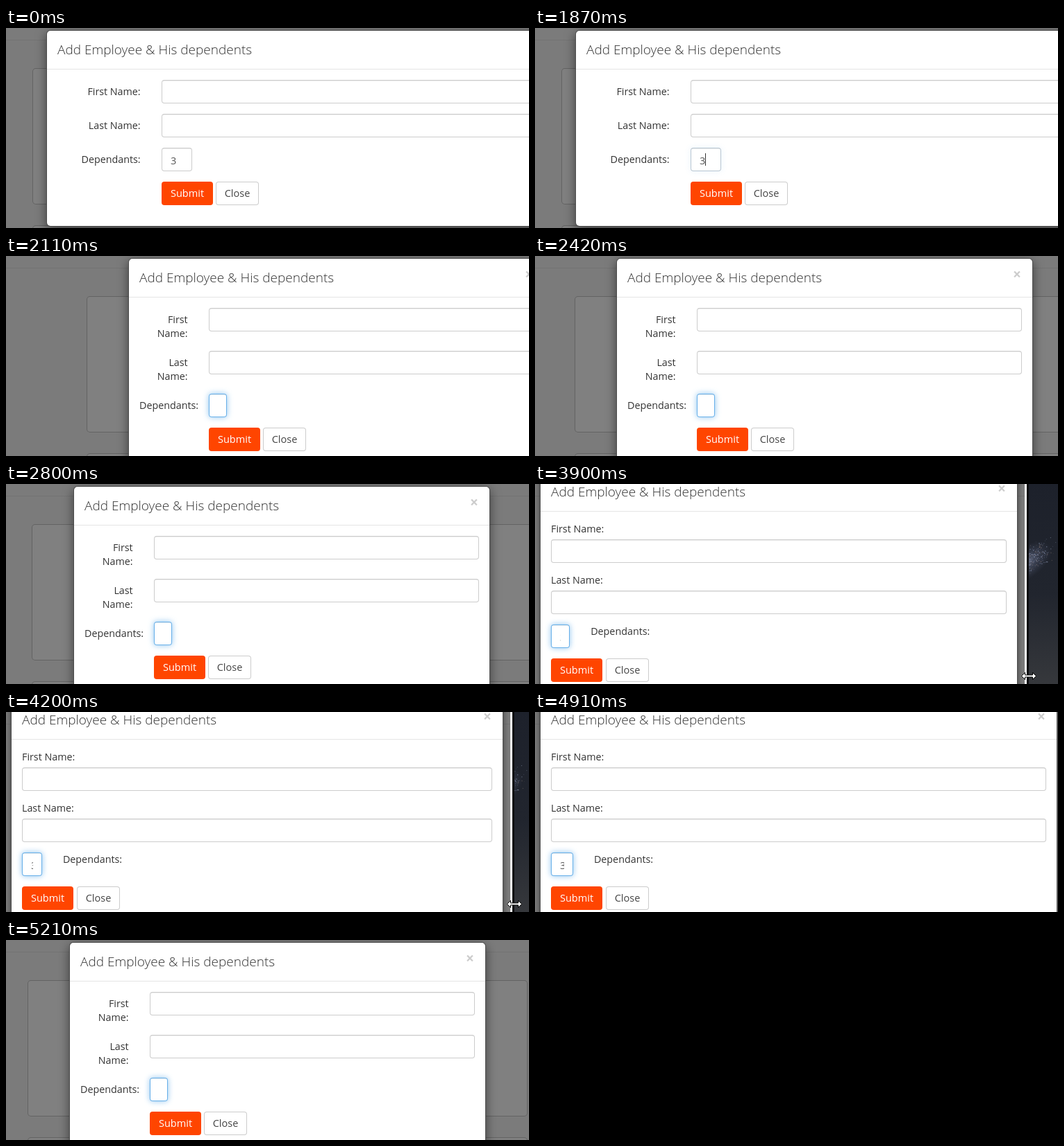
An HTML page with a canvas that plays this animation: 753 px wide and 289 px high, repeating every 5290 ms.

```html
<!DOCTYPE html>
<html lang="en">
<head>
<meta charset="utf-8">
<title>Responsive form dialog</title>
<style>
html, body { margin: 0; width: 100%; height: 100%; overflow: hidden; background: #7b7b7b; }
canvas { display: block; width: 100vw; height: 100vh; }
</style>
</head>
<body>
<canvas id="stage"></canvas>
<script>
const WIDTH = 753, HEIGHT = 289, LOOP = 5290;
const SHIFT = 3; // pixels of the page hidden left of the stage
const FONT = '"Open Sans", "Noto Sans", sans-serif';
const canvas = document.getElementById('stage');
const dpr = window.devicePixelRatio || 1;
canvas.width = WIDTH * dpr;
canvas.height = HEIGHT * dpr;
const ctx = canvas.getContext('2d');
ctx.scale(dpr, dpr);

// Window drags: start, end, number of redraws
const drags = [
  [1870, 2340, 7], [2420, 2800, 6], [2970, 3270, 5],
  [3720, 4200, 7], [4280, 4750, 7], [4830, 5210, 6]
];
// Window width over time
const widths = [
  [0, 1022], [1870, 1022], [1950, 1018], [2030, 1000], [2110, 955],
  [2260, 880], [2340, 850], [2420, 840], [2800, 800], [2970, 784],
  [3270, 695], [3720, 698], [4200, 729], [4280, 733], [4750, 758],
  [4830, 761], [4910, 765], [5210, 788]
];

function snap(t) {
  const drag = drags.filter(d => d[0] <= t).pop();
  if (!drag) return 0;
  const [start, end, count] = drag;
  const step = (end - start) / (count - 1);
  return start + step * Math.min(count - 1, Math.floor((t - start) / step + 1e-6));
}

function widthAt(t) {
  const i = widths.findIndex(k => k[0] > t);
  if (i < 0) return widths[widths.length - 1][1];
  const [t0, a] = widths[i - 1], [t1, b] = widths[i];
  return Math.round(a + (b - a) * (t - t0) / (t1 - t0));
}

function layoutFor(w) {
  const stack = w < 768, wide = w >= 992;
  const size = stack ? w - 20 : wide ? 900 : 600;
  const left = stack ? 10 - SHIFT : Math.round((w - size) / 2) - SHIFT;
  const col = (size - 2) / 12;
  const inner = left + 1, right = left + size - 1;
  const field = Math.round(inner + 15 + (stack ? 0 : 2 * col));
  return {
    w, stack, wide, size, left, col, inner, right, field,
    top: stack ? -17 : 3,
    bottom: wide ? 287 : 313,
    rows: stack ? [80, 154, 203, 252] : wide ? [75, 124, 173, 222] : [75, 137, 199, 248]
  };
}

function rect(x, y, w, h, r, fill) {
  ctx.fillStyle = fill;
  ctx.beginPath();
  ctx.roundRect(x, y, w, h, r);
  ctx.fill();
}

function box(x, y, w, h, border, fill, r = 4) {
  rect(x, y, w, h, r, border);
  rect(x + 1, y + 1, w - 2, h - 2, r - 1, fill);
}

function text(str, x, y, size, color, weight = 400, align = 'left') {
  ctx.font = `${weight} ${size}px ${FONT}`;
  ctx.fillStyle = color;
  ctx.textAlign = align;
  ctx.fillText(str, x, y);
}

function withShadow(color, blur, dy, draw) {
  ctx.save();
  ctx.shadowColor = color;
  ctx.shadowBlur = blur * dpr;
  ctx.shadowOffsetY = dy * dpr;
  draw();
  ctx.restore();
}

let seed = 11;
function random() {
  seed = (seed * 16807) % 2147483647;
  return seed / 2147483647;
}
const spread = () => random() + random() + random() - 1.5;
const dots = Array.from({ length: 330 }, () => {
  const along = spread() * 34, across = spread() * 15;
  return {
    x: 712 + along * 0.85 + across * 0.5,
    y: 109 - along * 0.55 + across * 0.85,
    size: 0.6 + random() * 0.8,
    color: random() < 0.3 ? '176,150,140' : '165,178,210',
    alpha: 0.15 + random() * 0.5
  };
});

function drawDesktop(edge) {
  const sky = ctx.createLinearGradient(0, 0, 0, HEIGHT);
  sky.addColorStop(0, '#1d212b');
  sky.addColorStop(0.55, '#21252e');
  sky.addColorStop(1, '#36383c');
  ctx.fillStyle = sky;
  ctx.fillRect(edge, 0, WIDTH - edge, HEIGHT);
  ctx.save();
  ctx.translate(704, 115);
  ctx.rotate(-0.6);
  ctx.scale(1, 0.5);
  const haze = ctx.createRadialGradient(0, 0, 0, 0, 0, 46);
  haze.addColorStop(0, 'rgba(170,180,212,.65)');
  haze.addColorStop(0.4, 'rgba(115,125,158,.35)');
  haze.addColorStop(1, 'rgba(90,100,130,0)');
  ctx.fillStyle = haze;
  ctx.fillRect(-46, -46, 92, 92);
  ctx.restore();
  for (const d of dots) {
    ctx.fillStyle = `rgba(${d.color},${d.alpha})`;
    ctx.fillRect(d.x, d.y, d.size, d.size);
  }
}

function drawPage(w) {
  const edge = w - SHIFT;
  if (edge < WIDTH) drawDesktop(edge);
  ctx.fillStyle = '#7b7b7b';
  ctx.fillRect(0, 0, edge, HEIGHT);
  ctx.fillStyle = '#737373';
  ctx.fillRect(0, 17, edge, 1);
  const grid = w >= 992 ? 970 : w >= 768 ? 750 : w;
  const x = Math.round((w - grid) / 2) + 15 - SHIFT;
  box(x, 58, grid - 30, 197, '#636363', '#808080', 5);
  box(x, 285, grid - 30, 60, '#636363', '#808080', 5);
}

function drawFrame(w) {
  const edge = w - SHIFT;
  if (edge >= WIDTH) return;
  ctx.fillStyle = '#f4f4f4';
  ctx.fillRect(edge, 0, 3, HEIGHT);
  ctx.fillStyle = '#0b0c10';
  ctx.fillRect(edge + 3, 0, 3, HEIGHT);
}

function drawField(x, y, w, focus = 0) {
  if (focus) withShadow(`rgba(102,175,233,${0.75 * focus})`, 8, 0, () => rect(x, y, w, 34, 4, '#fff'));
  const mix = (a, b) => Math.round(a + (b - a) * focus);
  box(x, y, w, 34, `rgb(${mix(204, 102)},${mix(204, 175)},${mix(204, 233)})`, '#fff');
  ctx.fillStyle = 'rgba(0,0,0,.07)';
  ctx.fillRect(x + 2, y + 1, w - 4, 1);
}

function drawLabels(l) {
  const label = (str, x, y, align) => text(str, x, y, 14.3, '#333', 500, align);
  const [y1, y2, y3] = l.rows;
  const start = l.inner + 15;
  const end = l.inner + 2 * l.col - 15;
  if (l.stack) {
    label('First Name:', start, y1 - 10);
    label('Last Name:', start, y2 - 10);
    label('Dependants:', l.inner + l.col + 15, y3 + 15);
    return;
  }
  [['First', y1], ['Last', y2]].forEach(([word, y]) => {
    if (l.wide) {
      label(word + ' Name:', end, y + 22, 'right');
    } else {
      label(word, end, y + 22, 'right');
      label('Name:', end, y + 42, 'right');
    }
  });
  if (l.wide) label('Dependants:', end, y3 + 22, 'right');
  else label('Dependants:', start, y3 + 22);
}

function drawCount(l, focus) {
  const x = l.field, y = l.rows[2];
  const w = Math.max(26, Math.floor(l.col - 29.85));
  drawField(x, y, w, focus);
  if (w <= 26) return;
  ctx.save();
  ctx.beginPath();
  ctx.rect(x + 13, y + 2, w - 26, 30);
  ctx.clip();
  text('3', x + 13, y + 24, 14.5, '#555');
  ctx.restore();
  if (focus && w > 40) {
    ctx.fillStyle = '#333';
    ctx.fillRect(x + 21, y + 8, 1, 18);
  }
}

function drawModal(l, focus) {
  const { left, top, size, inner, right, field, rows } = l;
  const height = l.bottom - top;
  withShadow('rgba(0,0,0,.5)', l.stack ? 9 : 15, l.stack ? 3 : 5,
    () => rect(left, top, size, height, 6, '#4c4c4c'));
  rect(inner, top + 1, size - 2, height - 2, 5, '#fff');
  ctx.fillStyle = '#e5e5e5';
  ctx.fillRect(inner, top + 56, size - 2, 1);
  text('Add Employee & His dependents', inner + 15, top + 35, 19, '#333', 300);
  text('×', right - 22, top + 31, 21, '#ccc', 700, 'center');

  drawLabels(l);
  const wide = right - 15 - field;
  drawField(field, rows[0], wide);
  drawField(field, rows[1], wide);
  drawCount(l, focus);

  const y = rows[3], close = field + (l.stack ? 79 : 78);
  box(field, y, 74, 34, '#ff4500', '#ff4500');
  text('Submit', field + 37, y + 22, 14.5, '#fff', 400, 'center');
  box(close, y, 62, 34, '#ccc', '#fff');
  text('Close', close + 31, y + 22, 14.5, '#444', 400, 'center');
}

function drawPointer(x, y) {
  const half = [[-10.5, 0], [-5.5, -5], [-5.5, -1.5], [5.5, -1.5], [5.5, -5], [10.5, 0]];
  const outline = half.concat(half.slice(1, -1).reverse().map(([a, b]) => [a, -b]));
  ctx.beginPath();
  outline.forEach(([a, b]) => ctx.lineTo(x + a, y + b));
  ctx.closePath();
  ctx.fillStyle = '#fff';
  ctx.fill();
  ctx.strokeStyle = '#000';
  ctx.lineWidth = 1;
  ctx.stroke();
}

function draw(t) {
  const now = snap(t);
  const w = widthAt(now);
  const focus = Math.max(0, Math.min(1, (now - 1850) / 100));
  ctx.clearRect(0, 0, WIDTH, HEIGHT);
  drawPage(w);
  drawModal(layoutFor(w), focus);
  drawFrame(w);
  if (w < 768) drawPointer(w + 3, 277.5);
}

const began = performance.now();
function tick() {
  draw((performance.now() - began) % LOOP);
  requestAnimationFrame(tick);
}
tick();
</script>
</body>
</html>
```
